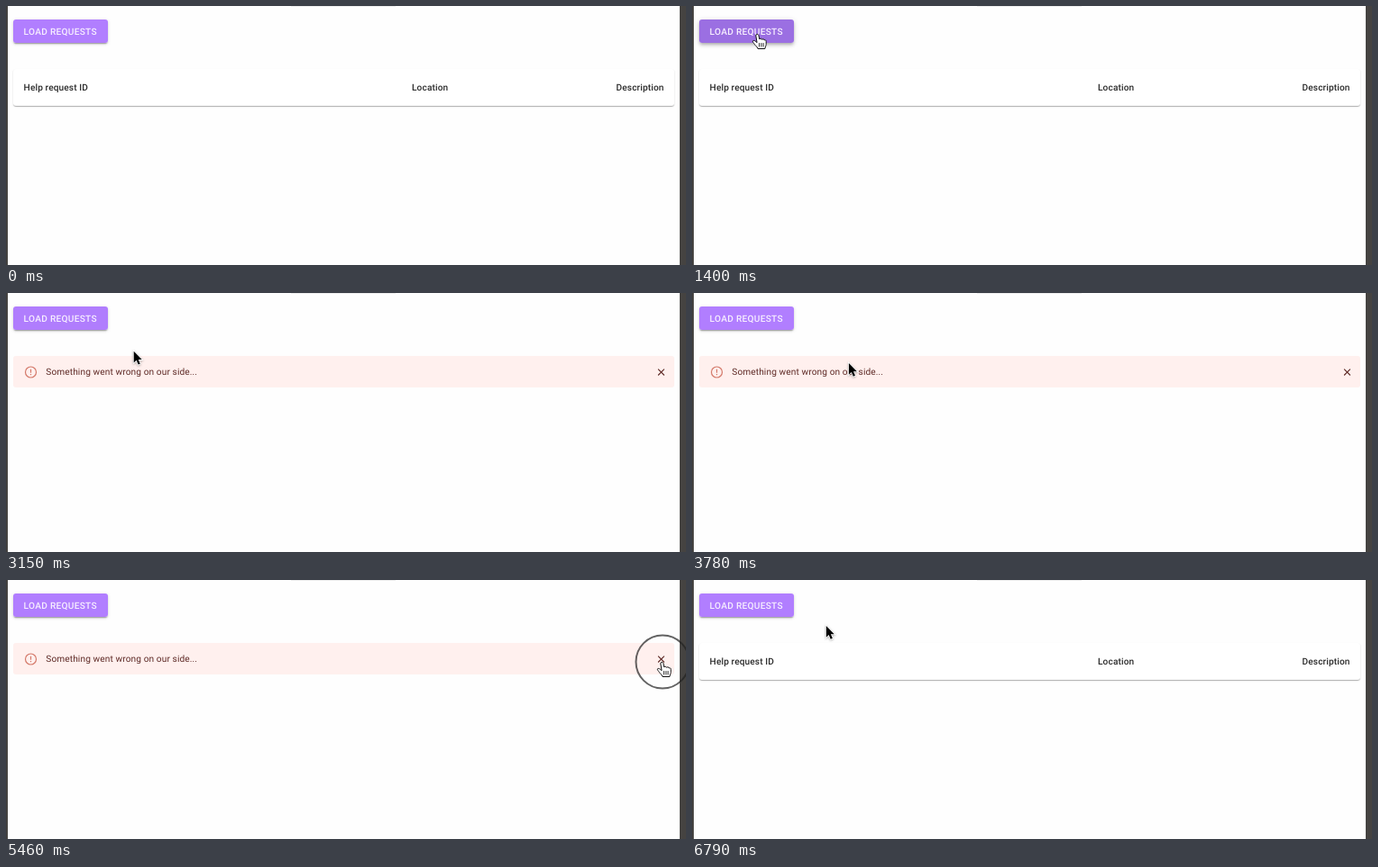
An HTML page that plays this animation: 754 px wide and 288 px high, repeating every 7000 ms.

```html
<!DOCTYPE html>
<html lang="en">
<head>
<meta charset="utf-8">
<title>Help requests</title>
<style>
  html, body { margin: 0; width: 100%; height: 100%; overflow: hidden; }
  body { position: relative; background: #fefefe; font: 10.15px Roboto, sans-serif; }
  div, svg { position: absolute; }
  text { text-rendering: geometricPrecision; }
  .edge { top: 0; height: 288px; background: #454341; }
  #tab { left: 316px; top: 0; width: 116px; height: 1px; background: #efefef; }
  #button, #glow { left: 7.7px; top: 14.7px; width: 105.4px; height: 26.4px; border-radius: 3px; }
  #button { overflow: hidden; }
  #glow {
    box-shadow: 0 2px 1px -1px rgba(0,0,0,.2), 0 1.5px 1.5px rgba(0,0,0,.14), 0 1px 4px rgba(0,0,0,.12);
  }
  #glow.up {
    box-shadow: 0 1.5px 3px -1px rgba(0,0,0,.2), 0 3px 3.6px rgba(0,0,0,.14), 0 1px 7px rgba(0,0,0,.12);
  }
  #ripple { border-radius: 50%; background: #fff; }
  #table, #alert { left: 8px; top: 70px; width: 733px; border-radius: 3px; }
  #table {
    height: 41px; background: #fff;
    box-shadow: 0 1.5px 1px -1px rgba(0,0,0,.2), 0 1px 1px rgba(0,0,0,.14), 0 1px 2px rgba(0,0,0,.12);
  }
  #alert { height: 35px; background: #fff0ee; }
  svg { left: 0; top: 0; }
  .med { font-weight: 500; letter-spacing: .0107em; fill: #2b2b2b; }
  .caps { font-weight: 500; letter-spacing: .0286em; fill: #f7efff; }
  .note { letter-spacing: .0107em; fill: #5f2a26; }
  #arrow { filter: drop-shadow(0 1px 1px rgba(0,0,0,.3)); }
</style>
</head>
<body>
<div class="edge" style="left:0;width:2px"></div>
<div class="edge" style="left:747px;width:7px"></div>
<div id="tab"></div>
<div id="glow"></div>
<div id="button"><div id="ripple"></div></div>
<div id="table"></div>
<div id="alert"></div>
<svg width="754" height="288" viewBox="0 0 754 288">
  <text class="caps" x="19.5" y="31.7">LOAD REQUESTS</text>
  <g id="heads" class="med">
    <text x="19.6" y="94.4">Help request ID</text>
    <text x="450" y="94.4">Location</text>
    <text x="729.6" y="94.4" text-anchor="end">Description</text>
  </g>
  <g id="message">
    <g fill="none" stroke="#d4796a" stroke-width="1.2">
      <circle cx="27.5" cy="88" r="6"/>
      <path d="M27.5 84.7v4M27.5 90v1.3"/>
    </g>
    <text class="note" x="44.3" y="91.3">Something went wrong on our side...</text>
    <path d="M723.1 84.7l6.8 6.8m0-6.8l-6.8 6.8" stroke="#5f2a26" stroke-width="1.1"/>
  </g>
  <g id="cursor">
    <circle id="ring" r="29.5" fill="none" stroke="#222" stroke-opacity=".7" stroke-width="2"/>
    <path id="arrow" transform="translate(.8 1) scale(.82)"
      d="M0 0V15.4L3.5 12.2L6 18L8.6 16.9L6.2 11.3H11Z"
      fill="#000" stroke="#fff" stroke-width="2" paint-order="stroke"/>
    <g id="hand" stroke="#111" stroke-linejoin="round" stroke-linecap="round">
      <path d="M-2.2 1.6C-2.2 0 .4-.2 .8 1.4L1.9 6C2.3 4.8 4.3 4.9 4.6 6.4C5.2 5.4 7 5.6 7.2 7C8 6.4 9.2 6.9 9.2 8.4V11.5C9.2 13.4 8.2 14 7.9 16.5H0C-.6 14.2-2.6 13.3-3.6 11.6C-4.3 10.2-6.3 8.8-5.5 7.8C-4.7 6.8-2.8 7.8-1.2 9.4Z" fill="#fff"/>
      <path d="M1.6 10.5V14M3.9 10.5V14M6.1 10.5V14" stroke-width=".9"/>
    </g>
    <g id="beam" fill="none">
      <path class="stem" stroke="#fff" stroke-width="2.6"/>
      <path class="stem" stroke="#000" stroke-width="1.1"/>
    </g>
  </g>
</svg>
<script>
const LOOP = 7000, STEP = 70;
const ENTER = 70, FOCUS = 1260, PRESS = 1960, LEAVE = 2940, CLOSE = 5460, HOLD = 140;
const $ = id => document.getElementById(id);
const at = (x, y) => ({ x, y });

// The pointer eases from stop to stop; "via" bends the way there.
const entry = at(704, 224);
const stops = [
  { from: ENTER, until: 630, to: at(66, 30) },
  { from: 700, until: 840, to: at(73, 31) },
  { from: 2870, until: 3640, to: at(92, 91), via: at(200, 55) },
  { from: 3640, until: 4270, to: at(351, 182), via: at(177, 32) },
  { from: 4410, until: 4900, to: at(722, 72) },
  { from: 4900, until: 5320, to: at(728, 91) },
  { from: 6020, until: 6090, to: at(689, 97) },
  { from: 6090, until: 6790, to: at(148, 50), via: at(440, 463) }
];

const stem = "M-3-6.5Q0-6.5 0-4.5Q0-6.5 3-6.5M0-4.5V4.5M-3 6.5Q0 6.5 0 4.5Q0 6.5 3 6.5M-1.6 2.3H1.6";
document.querySelectorAll(".stem").forEach(p => p.setAttribute("d", stem));

const ramp = (t, a, b) => Math.min(1, Math.max(0, (t - a) / (b - a)));
const ease = k => 1 - (1 - k) ** 2;
const mix = (a, b, k) => a.map((v, i) => v + (b[i] - v) * k);
const show = (id, on) => { $(id).style.display = on ? "" : "none"; };
const inside = (p, l, t, r, b) => p.x > l && p.x < r && p.y > t && p.y < b;

function pointer(t) {
  let p = entry;
  for (const { from, until, to, via } of stops) {
    if (t < from) break;
    const k = ease(ramp(t, from, until)), a = p;
    const axis = c => {
      const bend = via ? via[c] : (a[c] + to[c]) / 2;
      return (1 - k) ** 2 * a[c] + 2 * k * (1 - k) * bend + k * k * to[c];
    };
    p = at(axis("x"), axis("y"));
  }
  return p;
}

// The pointer's look follows from what lies below it.
function pointerShape(t, p, failed) {
  if (t < ENTER) return "";
  if (t < FOCUS) return "arrow";
  if (inside(p, 8, 15, 113, 41)) return "hand";
  if (failed && Math.hypot(p.x - 726.5, p.y - 88) < 14) return "hand";
  const onText = failed ? inside(p, 44, 82, 213, 95) : inside(p, 676, 84, 727, 99);
  return onText ? "beam" : "arrow";
}

function paintButton(t) {
  const hover = ease(ramp(t, FOCUS, FOCUS + 180)) - ease(ramp(t, LEAVE, LEAVE + 280));
  const fade = ramp(t, PRESS + 280, PRESS + 420);
  const press = ramp(t, PRESS, PRESS + HOLD) - fade;
  const color = mix(mix([177, 126, 255], [154, 110, 224], hover), [129, 91, 188], press);
  $("button").style.background = `rgb(${color.map(Math.round)})`;
  $("glow").className = hover > .5 ? "up" : "";

  const r = 92 * ramp(t, PRESS, PRESS + 420);
  Object.assign($("ripple").style, {
    left: 65 - r + "px", top: 16 - r + "px", width: 2 * r + "px", height: 2 * r + "px",
    opacity: .2 * (1 - fade)
  });
}

function draw(t) {
  const failed = t >= PRESS + HOLD && t < CLOSE + HOLD;
  for (const id of ["table", "heads"]) show(id, !failed);
  for (const id of ["alert", "message"]) show(id, failed);
  paintButton(t);

  const p = pointer(t), shape = pointerShape(t, p, failed);
  for (const id of ["arrow", "hand", "beam"]) show(id, id === shape);
  show("ring", [FOCUS, PRESS, CLOSE].some(c => t >= c && t < c + HOLD));
  $("cursor").setAttribute("transform", `translate(${p.x.toFixed(1)} ${p.y.toFixed(1)})`);
}

const start = performance.now();
function tick() {
  const t = (performance.now() - start) % LOOP;
  draw(Math.floor(t / STEP) * STEP);
  requestAnimationFrame(tick);
}
tick();
</script>
</body>
</html>
```
